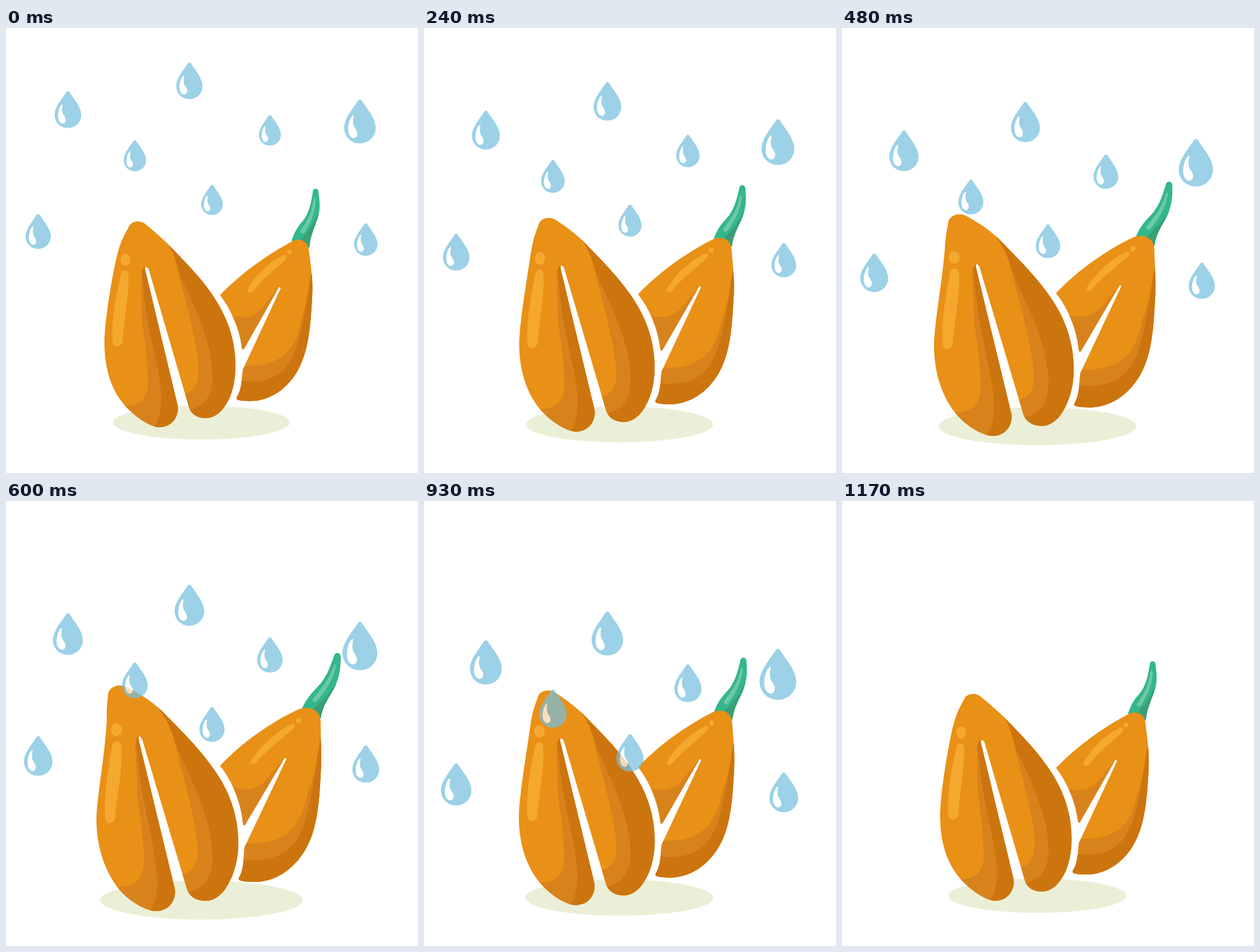
An HTML page with a canvas that plays this animation: 720x778 px, repeating every 1.2 s.

```html
<!DOCTYPE html>
<html lang="en">
<head>
<meta charset="utf-8">
<title>Seeds in the rain</title>
<style>
  html, body { margin: 0; width: 100%; height: 100%; overflow: hidden; background: #fff; }
  canvas { display: block; }
</style>
</head>
<body>
<canvas id="stage" width="720" height="778"></canvas>
<script>
const LOOP = 1200, RAIN_END = 1000, FALL = 0.1433, GROW = 0.0098;
const ctx = document.getElementById('stage').getContext('2d');

const ORANGE = '#e99016', MID = '#d8821c', DARK = '#cc750f', LIGHT = '#f5a82f';

// Pair of matching outlines: at rest and fully stretched.
const shape = (rest, full, color) => {
  const end = full.match(/-?[\d.]+/g).map(Number);
  return {
    color,
    at(u) {
      let i = 0;
      return new Path2D(rest.replace(/-?[\d.]+/g, n => +n + (end[i++] - n) * u));
    }
  };
};

const stem = {
  body: shape(
    'M536 287C536 279 546 279 546 287C549 308 549 318 545 331C539 350 532 362 530 384L499 372C507 348 514 344 522 333C531 318 533 306 536 287Z',
    'M573 272C574 263 585 264 585 272C585 292 583 304 578 317C571 338 555 350 550 380L517 364C525 344 538 332 550 319C563 302 566 290 573 272Z',
    '#33b78b'),
  parts: [
    shape('M549 318C538 342 528 358 511 374L535 390L550 340Z',
      'M580 314C570 332 552 352 533 366L552 384L585 340Z', '#3a9f74'),
    shape('M537 300C538 296 542 297 541 303C541 322 530 345 522 357C518 362 513 358 515 354C522 342 534 330 537 300Z',
      'M573 288C574 283 577 285 576 290C573 312 556 335 545 348C540 354 533 350 537 345C549 330 565 312 573 288Z', '#6ec8a5')
  ]
};

const backSeed = {
  body: shape(
    'M374 467C415 425 458 396 500 373C512 366 528 372 529 387C532 410 537 440 535 470C532 530 527 570 508 602C488 635 455 655 420 652C413 652 408 651 405 650Q401 648 404 644C412 632 412 612 414 597L480 455Q478 451 476 455L416 561Q413 564 412 558C408 525 392 490 374 467Z',
    'M374 463C410 424 465 385 512 364C530 358 549 364 550 386C550 410 551 435 551 455C548 530 544 575 523 610C500 648 466 668 428 666C420 666 414 665 408 663Q405 661 408 657C416 643 415 622 417 605L490 451Q488 447 486 451L418 566Q415 569 414 563C411 527 394 487 374 463Z',
    ORANGE),
  parts: [
    shape('M392 502C425 512 440 500 452 484C460 473 468 464 478 454L415 575L395 570Z',
      'M392 500C427 511 445 500 459 483C468 471 477 462 488 450L417 580L395 570Z', MID),
    shape('M408 590C455 594 487 580 503 550C514 528 514 515 517 507C524 485 530 460 534 430L570 430L570 700L390 700Z',
      'M410 598C460 602 493 590 511 558C523 534 525 519 528 508C537 483 543 460 549 425L570 430L570 700L390 700Z', MID),
    shape('M406 616C465 625 492 602 507 560C520 523 526 470 533 430L570 430L570 700L390 700Z',
      'M408 626C472 634 502 612 518 573C533 533 541 470 549 415L570 430L570 700L390 700Z', DARK),
    shape('M423 456C437 430 462 408 485 397C491 395 493 401 488 406C468 424 447 440 431 461C425 466 419 462 423 456Z',
      'M429 453C447 425 475 402 499 390C506 388 507 394 502 398C480 418 457 434 437 457C431 462 425 460 429 453Z', LIGHT)
  ],
  spot: [[495.5, 391.7, 4.4, 4.4], [511.6, 384.4, 4.8, 4.8]]
};

const frontSeed = {
  body: shape(
    'M214 349C219 336 236 335 245 344C262 358 278 372 291 386C320 416 344 441 363 470C388 508 401 547 401 590C401 622 393 648 381 663C373 675 361 682 349 682C335 682 325 676 320 664L250 424Q248 417 244 418Q242 420 244 426L300 660C303 678 291 698 268 698C252 698 224 679 206 658C184 632 172 596 172 548C173 510 184 440 194 398C199 378 204 366 214 349Z',
    'M178 343C177 321 203 318 216 328C245 343 266 359 284 379C318 413 344 441 364 470C391 508 406 551 406 598C406 632 396 660 382 680C373 692 361 699 349 699C334 699 321 693 316 678L239 420Q236 410 233 411Q231 413 232 418L295 678C298 699 284 717 262 717C244 717 211 698 193 673C171 642 158 602 158 556C159 516 173 443 176 385C176 370 176 358 178 343Z',
    ORANGE),
  parts: [
    shape('M281 374C296 393 299 420 306 447C316 487 337 560 337 600C337 622 329 634 313 640L315 710L430 710L430 374Z',
      'M266 362C286 387 293 413 300 443C311 490 335 570 335 614C335 636 326 648 308 653L310 720L430 720L430 362Z', MID),
    shape('M281 374C294 392 298 410 303 430C318 465 361 540 361 610C361 645 345 662 320 668L330 710L430 710L430 374Z',
      'M266 362C284 386 290 405 298 428C314 470 361 550 361 622C361 660 344 679 316 684L326 720L430 720L430 362Z', DARK),
    shape('M247 417C236 418 236 430 237 440C237 480 236 500 241 535C245 565 248 590 248 620C248 650 230 662 206 660L190 720L310 720L310 670Z',
      'M236 410C225 412 225 425 226 435C230 480 227 505 233 540C238 570 241 600 241 630C241 662 222 676 194 675L180 735L305 735L305 688Z', MID),
    shape('M247 417C234 420 237 432 239 440C244 510 256 550 265 595C271 625 274 655 268 675C266 688 262 694 254 702L310 720L310 670Z',
      'M236 410C223 414 227 426 229 436C235 510 248 555 257 605C263 638 267 670 262 692C259 706 254 713 246 720L305 735L305 688Z', DARK),
    shape('M200 434C200 421 215 420 214 434C215 470 206 510 204 546C203 560 187 561 186 547C184 510 192 470 200 434Z',
      'M185 431C186 416 202 416 202 430C204 470 194 515 191 552C190 567 174 567 173 553C171 515 178 470 185 431Z', LIGHT)
  ],
  spot: [[209, 405, 8.5, 10.8], [193, 400, 9.8, 11.2]]
};

// A drop 46 wide and 64 high, hanging from its tip.
const GLINT = 'M-10 23C-8 22 -10 27 -10 31C-11 42 -3 43 -4 51C-5 58 -13 58 -16 50C-19 41 -15 26 -10 23Z';
const glint = new Path2D(GLINT);
const water = new Path2D('M-3 2Q0 -2 3 2C9 12 23 27 23 41C23 54 13 64 0 64C-13 64 -23 54 -23 41C-23 27 -9 12 -3 2Z' + GLINT);

// x, top, width
const drops = [
  [320.5, 60, 46], [108.2, 110, 46.5], [225.2, 196, 39], [360, 274, 38],
  [461.2, 152, 38.5], [618.5, 125, 55], [56.3, 325, 44], [628.8, 341, 41]
];

function oval(a, b, u, color) {
  const [x, y, rx, ry] = a.map((n, i) => n + (b[i] - n) * u);
  ctx.fillStyle = color;
  ctx.beginPath();
  ctx.ellipse(x, y, rx, ry, 0, 0, Math.PI * 2);
  ctx.fill();
}

function paint({ body, parts, spot }, u) {
  const outline = body.at(u);
  ctx.fillStyle = body.color;
  ctx.fill(outline);
  ctx.save();
  ctx.clip(outline);
  for (const part of parts) {
    ctx.fillStyle = part.color;
    ctx.fill(part.at(u));
  }
  ctx.restore();
  if (spot) oval(...spot, u, LIGHT);
}

function rain(t) {
  for (const [x, top, width] of drops) {
    const scale = (width + GROW * t) / 46;
    ctx.save();
    ctx.translate(x, top + FALL * t);
    ctx.scale(scale, scale);
    ctx.fillStyle = 'rgba(119,191,222,.72)';
    ctx.fill(water, 'evenodd');
    ctx.fillStyle = 'rgba(255,255,255,.72)';
    ctx.fill(glint);
    ctx.restore();
  }
}

function draw() {
  const t = performance.now() % LOOP;
  const u = 1 - Math.abs(1 - t / (LOOP / 2));
  ctx.fillStyle = '#fff';
  ctx.fillRect(0, 0, 720, 778);
  oval([341.5, 689.7, 154.5, 29.7], [341.5, 697.8, 177, 34], u, '#ebefd7');
  paint(stem, u);
  paint(backSeed, u);
  paint(frontSeed, u);
  if (t < RAIN_END) rain(t);
  requestAnimationFrame(draw);
}
draw();
</script>
</body>
</html>
```
